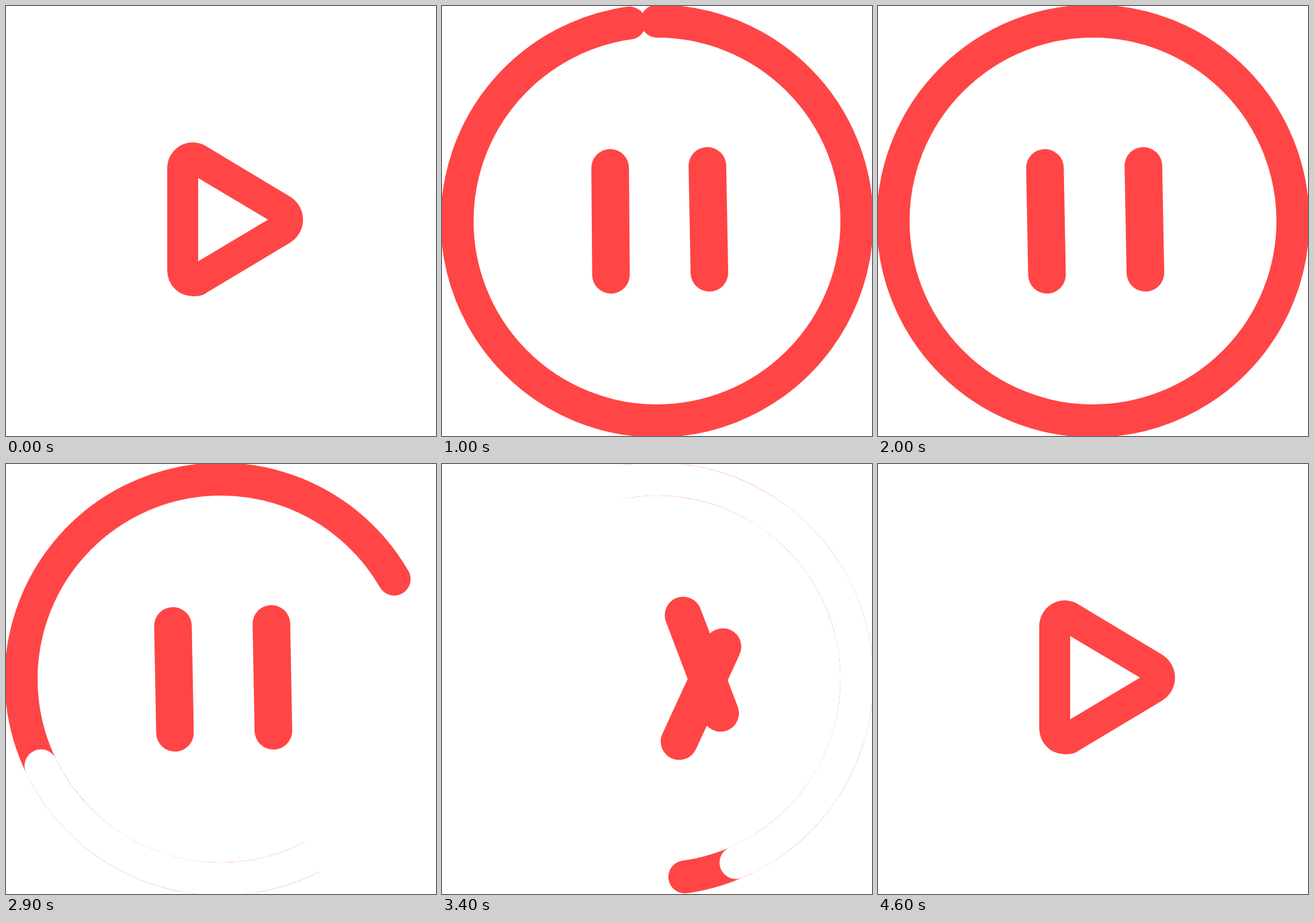
An HTML page for the animation above (5600 ms loop, 640 px wide and 640 px high).

```html
<!DOCTYPE html>
<html lang="en">
<head>
<meta charset="utf-8">
<title>Play and pause</title>
<style>
  html, body { margin: 0; width: 100%; height: 100%; overflow: hidden; background: #fff; }
  svg { display: block; width: 100%; height: 100%; }
  circle, line { fill: none; stroke: #ff4545; stroke-linecap: round; }
  circle { stroke-width: 49; }
  #wipe { stroke: #fff; }
  #play { fill: #ff4545; fill-rule: evenodd; }
</style>
</head>
<body>
<svg viewBox="0 0 640 640">
  <circle id="ring" cx="320" cy="320" r="297.5" pathLength="360"/>
  <circle id="wipe" cx="320" cy="320" r="297.5" pathLength="360"/>
  <g id="bars"><line/><line/><line/></g>
  <path id="play" d="M240 241A38 38 0 0 1 297.5 208.5L422.5 283.6A40 40 0 0 1 422.5 352.4
    L298 427C292 431.5 286 432 278 432A38 38 0 0 1 240 394ZM286 256V380L390 318Z"/>
</svg>
<script>
const LOOP = 5600, STEP = 100;
const PLAY_OUT = 100, WIPE_START = 2600, WIPE_END = 3800, PLAY_IN = 4500;
const $ = id => document.getElementById(id);
const ring = $('ring'), wipe = $('wipe'), bars = $('bars'), play = $('play');

const clamp = u => Math.min(1, Math.max(0, u));
const easeIn = u => u * u;
const easeOut = u => 1 - (1 - u) ** 2;
const easeInOut = u => u * u * (3 - 2 * u);
// Critically damped approach to 1
const settle = x => 1 - (1 + x) * Math.exp(-x);

const pose = (x1, y1, x2, y2, r) => ({ x1, y1, x2, y2, r });
const top_ = pose(278, 226, 411, 304, 23);
const bottom = pose(411, 331.5, 280, 409.5, 23);
const side = pose(263, 241, 263, 395, 23);
const left = pose(248.5, 241, 251.5, 400, 28);
const right = pose(395, 238, 398, 397, 28);
// A side shrunk to a point
const dot = (x, y) => pose(x, y, x, y, 0);

// Each bar: [arrival time, pose, easing of the way there]
const moves = [
  [
    [300, bottom],
    [400, pose(411, 331.5, 300, 398.5, 23), easeIn],
    [1000, right, easeInOut],
    [2900, right, easeIn],
    [3400, pose(359, 225, 414.5, 371, 27.5), easeIn],
    [PLAY_IN, top_, easeOut]
  ],
  [
    [0, top_],
    [300, dot(411, 304), easeIn],
    [600, dot(252, 400), easeIn],
    [1000, left, easeOut],
    [2900, left, easeIn],
    [3400, pose(418, 272, 353, 413, 27.5), easeIn],
    [PLAY_IN, bottom, easeOut]
  ],
  [
    [0, side],
    [300, dot(263, 395), easeIn],
    [3900, dot(263, 241), easeIn],
    [PLAY_IN, side, easeOut]
  ]
];

function poseAt(keys, t) {
  const next = keys.findIndex(key => key[0] > t);
  if (next < 1) return { ...keys.at(next)[1] };
  const [t0, from] = keys[next - 1], [t1, to, ease] = keys[next];
  const u = ease((t - t0) / (t1 - t0));
  return Object.fromEntries(Object.keys(from).map(k => [k, from[k] + (to[k] - from[k]) * u]));
}

function show(el, on) {
  el.style.display = on ? '' : 'none';
}

function arc(el, from, to) {
  show(el, to > from);
  el.setAttribute('transform', `rotate(${from - 90} 320 320)`);
  el.setAttribute('stroke-dasharray', `${Math.max(0, to - from)} 720`);
}

function drawRing(t) {
  if (t <= WIPE_START) {
    const u = clamp((t - 7) / 1380);
    arc(ring, 0, 360 * (1 - (1 - u) ** 3));
    show(wipe, false);
  } else if (t < WIPE_END) {
    const s = (t - WIPE_START) / 1000;
    const start = -389 * settle(5.93 * s);
    arc(ring, start, 360 - 580 * settle(5.78 * s));
    arc(wipe, start - 5, -213 * settle(6.07 * s));
  } else {
    show(ring, false);
    show(wipe, false);
  }
}

function drawIcon(t) {
  const resting = t < PLAY_OUT || t >= PLAY_IN;
  show(play, resting);
  show(bars, !resting);
  moves.forEach((keys, i) => {
    const { r, ...ends } = poseAt(keys, t);
    // The left bar sways a little before it comes to rest
    if (i === 1 && t >= 1000 && t < 2000) ends.x1 += 10 * Math.sin(Math.PI * (2000 - t) / 1060);
    const attrs = { ...ends, 'stroke-width': 2 * r };
    for (const name in attrs) bars.children[i].setAttribute(name, attrs[name]);
  });
}

const begin = performance.now();
function frame() {
  const now = (performance.now() - begin) % LOOP;
  const t = Math.floor(now / STEP) * STEP;
  drawRing(t);
  drawIcon(t);
  requestAnimationFrame(frame);
}
frame();
</script>
</body>
</html>
```
